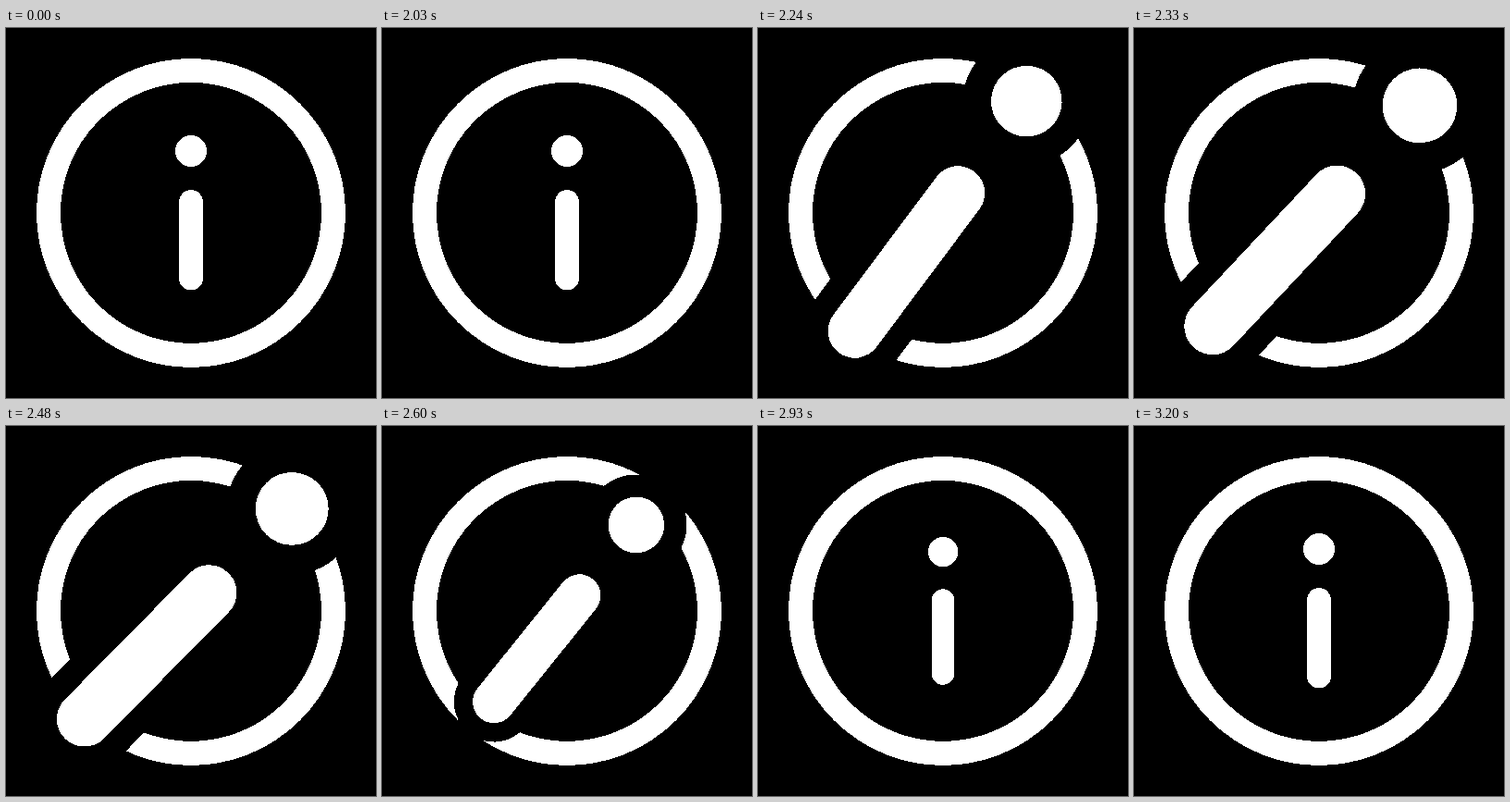
Write an HTML page with a canvas that moves like this. It is 400 px wide and 400 px high and loops after 3260 ms.

```html
<!DOCTYPE html>
<html lang="en">
<head>
<meta charset="utf-8">
<title>Info icon</title>
<style>
  html, body { margin: 0; width: 100%; height: 100%; overflow: hidden; background: #000; }
  canvas { display: block; width: 400px; height: 400px; }
</style>
</head>
<body>
<canvas id="stage" width="400" height="400"></canvas>
<script>
const ctx = document.getElementById('stage').getContext('2d', { willReadFrequently: true });
const SIZE = 400, LOOP = 3260, START = 2030, STEP = 30, LAST = 3200;

// Cubic bezier easing with flat ends; x1 and x2 set the sharpness.
function ease(u, x1, x2) {
  let lo = 0, hi = 1;
  for (let i = 0; i < 24; i++) {
    const s = (lo + hi) / 2, r = 1 - s;
    if (3 * r * r * s * x1 + 3 * r * s * s * x2 + s * s * s < u) lo = s;
    else hi = s;
  }
  return lo * lo * (3 - 2 * lo);
}

// Keys: { t, v, x1, x2 }, where the easing leads into the key.
function valueAt(keys, t) {
  if (t <= keys[0].t) return keys[0].v;
  for (let i = 1; i < keys.length; i++) {
    const a = keys[i - 1], b = keys[i];
    if (t < b.t) return a.v + (b.v - a.v) * ease((t - a.t) / (b.t - a.t), b.x1, b.x2);
  }
  return keys[keys.length - 1].v;
}

const angleKeys = [
  { t: START, v: 0 },
  { t: 2430, v: 45, x1: 0.31, x2: 0.21 },
  { t: 2955, v: 0, x1: 0.65, x2: 0.35 }
];
const scaleKeys = [
  { t: START, v: 1 },
  { t: 2400, v: 2.4, x1: 0.2, x2: 0.1 },
  { t: 2750, v: 0.78, x1: 0.63, x2: 0.75 },
  { t: 3050, v: 1, x1: 0.4, x2: 0.4 }
];

function disc(y, radius) {
  ctx.beginPath();
  ctx.arc(0, y, radius, 0, Math.PI * 2);
  ctx.fill();
}

function bar(radius) {
  ctx.lineWidth = radius * 2;
  ctx.beginPath();
  ctx.moveTo(0, -12);
  ctx.lineTo(0, 70.7);
  ctx.stroke();
}

function letter(color, dotRadius, barRadius) {
  ctx.fillStyle = ctx.strokeStyle = color;
  disc(-67, dotRadius);
  bar(barRadius);
}

// Turns soft edges into pure black and white.
function hardenEdges() {
  const image = ctx.getImageData(0, 0, SIZE, SIZE), data = image.data;
  for (let i = 0; i < data.length; i += 4) {
    data[i] = data[i + 1] = data[i + 2] = data[i] < 128 ? 0 : 255;
  }
  ctx.putImageData(image, 0, 0);
}

function draw(t) {
  const scale = valueAt(scaleKeys, t);
  ctx.setTransform(1, 0, 0, 1, 0, 0);
  ctx.fillStyle = '#000';
  ctx.fillRect(0, 0, SIZE, SIZE);
  ctx.translate(SIZE / 2, SIZE / 2);

  ctx.strokeStyle = '#fff';
  ctx.lineWidth = 26;
  ctx.beginPath();
  ctx.arc(0, 0, 154, 0, Math.PI * 2);
  ctx.stroke();

  ctx.rotate(valueAt(angleKeys, t) * Math.PI / 180);
  ctx.scale(scale, scale);
  ctx.lineCap = 'round';
  letter('#000', 30.6, 24.3);
  letter('#fff', 17, 12.9);
  hardenEdges();
}

const origin = performance.now();

function tick() {
  const t = (performance.now() - origin) % LOOP;
  const stepped = START + Math.floor((t - START) / STEP) * STEP;
  draw(t < START ? 0 : Math.min(stepped, LAST));
  requestAnimationFrame(tick);
}
tick();
</script>
</body>
</html>
```
